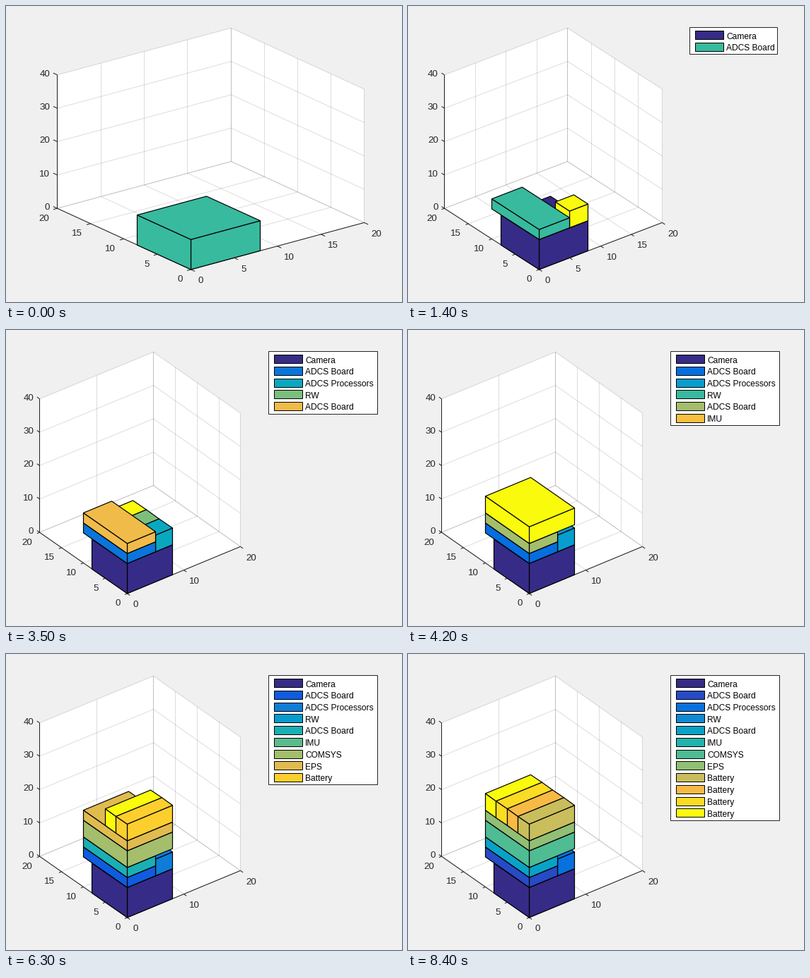
Write a matplotlib script that moves like this. It is 560x420 px and loops after 9.1 s.

```python
import numpy as np
import matplotlib.pyplot as plt
from matplotlib.animation import FuncAnimation
from matplotlib.patches import Polygon, Rectangle

W, H, DPI = 560, 420, 100
PX = 72 / DPI  # points per pixel
INK = (0.15, 0.15, 0.15)
TOP, BOTTOM = 31.2, 373.9
AZ, EL = np.radians(37.5), np.radians(30)

# Key colours of a 64-level ramp: level, red, green, blue.
RAMP = np.array([
    (0, 0.21, 0.17, 0.53), (4, 0.20, 0.26, 0.73), (7, 0.06, 0.36, 0.87),
    (10, 0.02, 0.43, 0.88), (16, 0.08, 0.52, 0.83), (21, 0.03, 0.61, 0.81),
    (26, 0.04, 0.67, 0.74), (32, 0.22, 0.73, 0.62), (39, 0.53, 0.75, 0.47),
    (46, 0.79, 0.74, 0.36), (52, 0.97, 0.73, 0.27), (56, 0.99, 0.81, 0.18),
    (63, 0.98, 0.98, 0.05)])

# name, corner, size
PARTS = [
    ("Camera", (0, 0, 0), (8, 8, 9)),
    ("ADCS Board", (0, 0, 9), (5, 10, 3)),
    ("ADCS Processors", (5, 0, 9), (3, 3, 5)),
    ("RW", (5, 3, 9), (3, 3, 5)),
    ("ADCS Board", (0, 0, 12), (5, 10, 3)),
    ("IMU", (5, 6, 9), (3, 3, 5)),
    ("COMSYS", (0, 0, 15), (8, 10, 5)),
    ("EPS", (0, 0, 20), (8, 10, 3)),
] + [("Battery", (0, 2.5 * i, 23), (8, 2.5, 5)) for i in range(4)]

plt.rcParams["font.family"] = "Liberation Sans"
fig = plt.figure(figsize=(W / DPI, H / DPI), dpi=DPI, facecolor=(240 / 255,) * 3)
ax = fig.add_axes([0, 0, 1, 1])


def crisp(v):
    """Centre of the pixel that holds v."""
    return np.floor(v) + 0.5


def color(i, n):
    level = 32 if n == 1 else min(63, i * 64 // (n - 1))
    return [np.interp(level, RAMP[:, 0], RAMP[:, c]) for c in (1, 2, 3)]


def legend_width(rows):
    return 64 + 6 * max(len(part[0]) for part in PARTS[:rows])


def plot_edges(rows):
    """The plot gives way to a wider legend."""
    if rows == 0:
        return 72.8, 506.8
    extra = (legend_width(rows) - 100) / 54
    return 55 - 7 * extra, 381 - 49 * extra


class View:
    """Parallel projection of the 20 x 20 x 40 space onto the stage."""

    def __init__(self, left, right):
        sx, sy = np.cos(AZ), np.sin(AZ)
        wide = (right - left) / (sx + sy) / 20
        tall = (BOTTOM - TOP) / ((sx + sy) * np.sin(EL) + np.cos(EL))
        self.ex = np.array([sx * wide, -sy * np.sin(EL) * tall / 20])
        self.ey = np.array([-sy * wide, -sx * np.sin(EL) * tall / 20])
        self.ez = np.array([0, -np.cos(EL) * tall / 40])
        self.origin = np.array([left + 20 * sy * wide, BOTTOM])

    def __call__(self, x, y, z):
        px, py = self.origin + x * self.ex + y * self.ey + z * self.ez
        return np.array([crisp(px - 0.1), py])


def line(a, b, alpha=1.0, z=1):
    ax.plot([a[0], b[0]], [a[1], b[1]], color=INK, alpha=alpha, lw=1.05 * PX,
            solid_capstyle="butt", snap=False, zorder=z)


def label(x, y, text, size, ha="left", ink=INK, z=2):
    ax.text(x, y, text, fontsize=size * PX, ha=ha, va="baseline",
            color=ink, zorder=z)


def face(points, fill, edge="black", z=3):
    ax.add_patch(Polygon(points, closed=True, facecolor=fill, edgecolor=edge,
                         lw=1.2 * PX, joinstyle="round", zorder=z))


def draw_axes(p):
    gap = 5 if p(20, 0, 0)[0] - p(0, 20, 0)[0] > 300 else 10
    outline = [p(0, 0, 0), p(20, 0, 0), p(20, 0, 40),
               p(20, 20, 40), p(0, 20, 40), p(0, 20, 0)]
    face(outline, "white", "none", 0)

    for x in range(0, 21, gap):
        line(p(x, 0, 0), p(x, 20, 0), 0.15)
        line(p(x, 20, 0), p(x, 20, 40), 0.15)
    for y in range(0, 21, 5):
        line(p(0, y, 0), p(20, y, 0), 0.15)
        line(p(20, y, 0), p(20, y, 40), 0.15)
    for z in range(0, 41, 10):
        line(p(0, 20, z), p(20, 20, z), 0.15)
        line(p(20, 20, z), p(20, 0, z), 0.15)

    line(p(0, 0, 0), p(20, 0, 0), z=2)
    line(p(0, 0, 0), p(0, 20, 0), z=2)
    line(p(0, 20, 0), p(0, 20, 40), z=2)

    along_x, along_y = 0.45 * p.ex, 0.6 * p.ey
    for x in range(0, 21, gap):
        a = p(x, 0, 0)
        line(a, a - along_y, z=2)
        label(a[0] - along_y[0] + 4.2, a[1] + 19.3, str(x), 13.33)
    for y in range(0, 21, 5):
        a = p(0, y, 0)
        line(a, a - along_x, z=2)
        label(a[0] - along_x[0] - 6.3, a[1] + 17.5, str(y), 13.33, "right")
    for z in range(0, 41, 10):
        a = p(0, 20, z)
        line(a, a + along_y, z=2)
        label(a[0] + along_y[0] - 4.7, a[1] + 2, str(z), 13.33, "right")


def draw_box(p, corner, size, fill):
    x, y, z = corner
    u, v, w = np.add(corner, size)
    face([p(x, y, z), p(u, y, z), p(u, y, w), p(x, y, w)], fill)
    face([p(x, y, z), p(x, v, z), p(x, v, w), p(x, y, w)], fill)
    face([p(x, y, w), p(u, y, w), p(u, v, w), p(x, v, w)], fill)


def panel(x, y, w, h, fill, edge, z):
    ax.add_patch(Rectangle((x, y), w, h, facecolor=fill, edgecolor=edge,
                           lw=PX, snap=False, zorder=z))


def draw_legend(rows, n):
    width, top, pitch = legend_width(rows), 30.5, 16.72
    left = crisp(520.5 + 5 * (width - 100) / 54) - width
    panel(left, top, width, round(pitch * rows + 5), "white", INK, 5)
    for i in range(rows):
        mid = top + 11.3 + pitch * i
        panel(left + 8, crisp(mid - 6), 40, 12, color(i, n), "black", 6)
        label(left + 51.5, mid + 4.8, PARTS[i][0], 12, ink="black", z=6)


def draw(step):
    """Each step adds one part; the legend names those placed before it."""
    ax.cla()
    ax.set(xlim=(0, W), ylim=(H, 0))
    ax.axis("off")
    n = min(step + 1, len(PARTS))
    view = View(*plot_edges(step))
    draw_axes(view)

    def far_first(i):
        x, y, z = PARTS[i][1]
        return z, -y, -x

    for i in sorted(range(n), key=far_first):
        draw_box(view, PARTS[i][1], PARTS[i][2], color(i, n))
    if step:
        draw_legend(step, n)
    return []


anim = FuncAnimation(fig, draw, frames=len(PARTS) + 1, interval=700,
                     repeat=True, repeat_delay=0, init_func=lambda: [])
plt.show()
```
